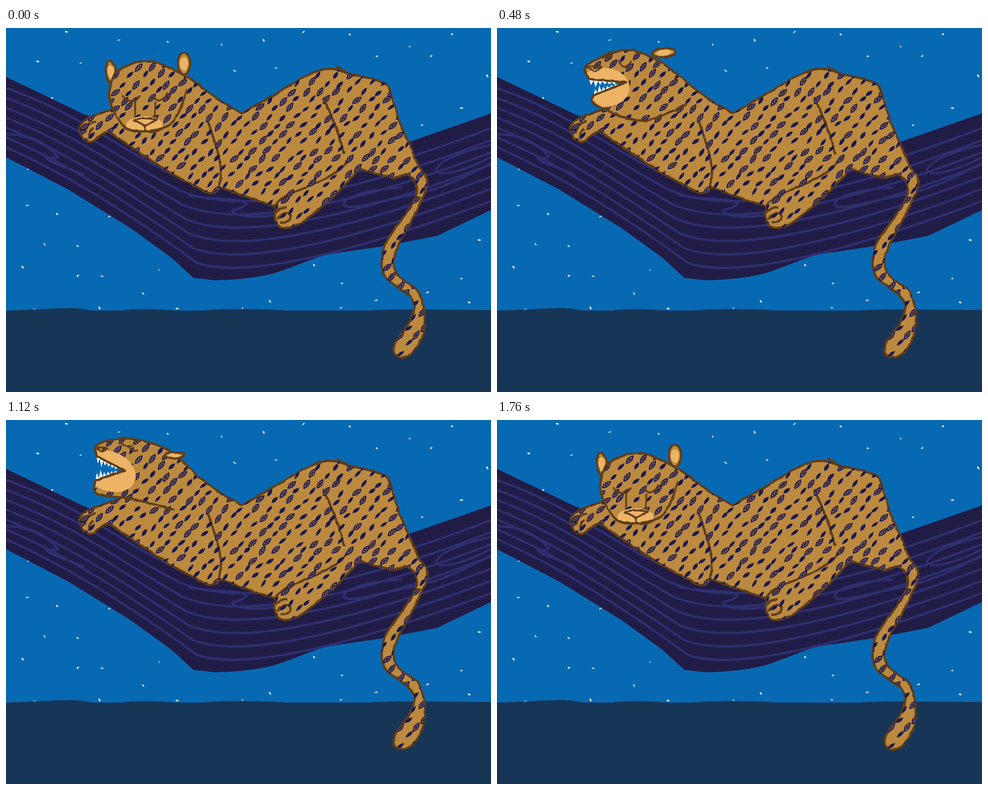
Write an HTML page that moves like this. It is 864x648 px and loops after 1840 ms.

```html
<!DOCTYPE html>
<html lang="en">
<head>
<meta charset="utf-8">
<title>Sleepy leopard</title>
<style>
  html, body { margin: 0; width: 100%; height: 100%; overflow: hidden; background: #0869b3; }
  svg { display: block; width: 100vw; height: 100vh; }
  .line { fill: none; stroke: #5f3d18; stroke-width: 4; stroke-linejoin: round; }
  .thin { stroke-width: 3.2; }
  .grain { fill: none; stroke: #2f2f70; stroke-width: 4; }
  .fur { fill: #bb8a3f; }
  .pale { fill: #edb466; }
  .bare { stroke: none; }
</style>
</head>
<body>
<svg viewBox="0 0 864 648">
  <defs>
    <filter id="rough" filterUnits="userSpaceOnUse" x="0" y="0" width="864" height="648" color-interpolation-filters="sRGB">
      <feTurbulence id="noise" type="fractalNoise" baseFrequency=".08" numOctaves="2" seed="1" result="n"/>
      <feDisplacementMap in="SourceGraphic" in2="n" scale="3.5" xChannelSelector="R" yChannelSelector="G"/>
    </filter>
    <path id="head"/>
    <path id="body"/>
    <path id="tail"/>
    <clipPath id="face"><use href="#head"/></clipPath>
    <clipPath id="skin"><use href="#head"/><use href="#body"/><use href="#tail"/></clipPath>
  </defs>

  <rect width="864" height="648" fill="#0869b3"/>
  <path id="stars" fill="#eef4f8"/>
  <path fill="#173556" d="M0,503 C50,502 90,498 125,499 C142,500 148,503 157,503 L206,503 C235,498 275,501 300,503 L350,503 C385,499 450,500 485,502 L497,503 L645,503 C690,499 780,502 864,502 V648 H0 Z"/>

  <path fill="#201c46" d="M0,87 L140,154 L420,260 L720,202 L864,152 V324 L768,370 L675,388 L566,404 L500,429 C465,443 420,448 372,449 L334,445 L297,411 L281,399 L220,355 L110,287 L0,230 Z"/>
  <path id="grain" class="grain"/>
  <g class="grain">
    <path d="M0,189 C45,190 72,204 92,229 C88,234 80,229 72,231 C80,242 105,246 140,262"/>
    <path d="M325,298 C380,308 425,302 428,313 C420,324 398,322 404,328 C425,342 470,332 500,334"/>
    <path d="M705,284 C655,286 604,298 601,314 C608,327 660,309 720,298 C780,286 825,262 864,240"/>
    <path d="M864,208 C815,219 770,236 766,253 C775,267 820,253 864,230"/>
  </g>

  <use href="#body" class="fur"/>
  <use href="#tail" class="fur"/>
  <g class="line" filter="url(#rough)">
    <path id="bodyLine"/>
    <use href="#tail"/>
    <path d="M480,318 C484,300 515,292 545,280 C570,266 600,256 607,236 M565,124 C578,150 592,182 602,224"/>
    <path d="M484,341 C487,329 507,325 507,336 C505,345 495,348 489,346 M481,329 Q489,318 500,319"/>
    <path d="M140,187 C143,172 151,168 160,166 M150,197 C146,188 150,182 156,179"/>
    <path d="M360,167 C371,203 390,242 380,282"/>
    <path d="M589,68 L606,79"/>
    <ellipse id="farEar" class="fur"/>
    <ellipse id="farEarIn" class="pale bare"/>
  </g>

  <use href="#head" class="fur"/>
  <g clip-path="url(#skin)">
    <path id="spots" fill="#1e1850"/>
    <path id="slits" fill="none" stroke="#8f6a45" stroke-width="1.2"/>
  </g>
  <g clip-path="url(#face)"><ellipse id="muzzle" class="pale"/></g>
  <path id="teeth" fill="#fff"/>
  <g class="line" filter="url(#rough)">
    <use href="#head"/>
    <ellipse id="ear" class="fur"/>
    <ellipse id="earIn" class="pale bare"/>
    <path id="gape" fill="#fff"/>
    <circle id="tongue" class="bare" style="fill:#e0a065"/>
    <path id="features" class="thin"/>
  </g>
</svg>
<script>
const $ = id => document.getElementById(id);
const set = (id, attrs) => {
  for (const k in attrs) $(id).setAttribute(k, attrs[k]);
};
const lerp = (a, b, t) => Array.isArray(a) ? a.map((v, i) => lerp(v, b[i], t)) : a + (b - a) * t;

let state = 7;
const rand = (lo, hi) => {
  state = (state * 16807) % 2147483647;
  return lo + (hi - lo) * state / 2147483647;
};

// Leaf outline centred on x,y: half length l, bulge w, turned by a
function leaf(x, y, l, w, a) {
  const c = Math.cos(a), s = Math.sin(a);
  const at = (u, v) => (x + u * c - v * s).toFixed(1) + ',' + (y + u * s + v * c).toFixed(1);
  return `M${at(-l, 0)}Q${at(-1, -w)} ${at(l, 0)}Q${at(1, w)} ${at(-l, 0)}Z`;
}

// Staggered grid with every point nudged at random
function scatter(x0, y0, x1, y1, dx, dy, jitter, put) {
  for (let y = y0, row = 0; y < y1; y += dy, row++)
    for (let x = x0 + (row % 2) * dx / 2; x < x1; x += dx)
      put(x + rand(-jitter, jitter), y + rand(-jitter, jitter));
}

let stars = '', spots = '', slits = '';
scatter(20, 15, 864, 500, 86, 52, 24, (x, y) => {
  stars += leaf(x, y, rand(1.8, 3.6), rand(1.5, 3.5), rand(-1.2, 1.2));
});
scatter(130, 38, 755, 590, 26, 15, 4, (x, y) => {
  const big = rand(0, 1) < .4, a = rand(-1.05, -.6);
  spots += big ? leaf(x, y, 10.5, 9, a) : leaf(x, y, rand(7.5, 9), rand(5, 7), a);
  if (big) slits += leaf(x, y, 6, 4, a);
});
set('stars', { d: stars });
set('spots', { d: spots });
set('slits', { d: slits });

// Wood grain: curves blended from the upper edge to the lower one
const upper = [0, 107, 130, 152, 200, 215, 300, 262, 420, 318, 640, 265, 864, 178];
const lower = [0, 212, 120, 265, 240, 345, 340, 418, 430, 450, 640, 392, 864, 308];
let grain = '';
for (let i = 0; i <= 6; i++) {
  const [x, y, ...rest] = lerp(upper, lower, i / 6);
  grain += `M${x},${y}C${rest}`;
}
set('grain', { d: grain });

const belly = `M212,137 C175,151 128,160 131,180 Q134,203 151,203 C163,200 169,186 182,184 C215,205 256,236 300,262
  L358,293 Q377,297 380,282 C412,296 445,306 480,318 C476,345 483,356 497,356 C520,355 528,345 545,332
  C580,306 605,280 629,250 C655,260 670,262 692,267 L712,260`;
const back = `737,250 L722,215 L700,165 L688,125 Q684,105 675,98 L650,90 L606,80 Q592,71 570,73
  C545,76 510,99 480,118 L420,152 L378,127 L325,88`;
set('body', { d: belly + 'L' + back });
set('bodyLine', { d: belly + 'M' + back });
set('tail', { d: `M712,260 C730,268 740,285 725,310 C705,345 685,365 675,385 C666,410 666,440 685,452
  C700,465 722,472 727,492 C731,510 712,535 695,557 C684,578 694,588 709,586 C730,582 747,550 746,520
  C746,490 738,466 722,458 C700,445 690,435 690,415 C692,385 726,345 740,306 C750,288 754,275 747,260 L735,247` });

// Head points: neck, crown, brow, nose, lip | mouth corner | jaw, chin, throat, cheek
// Ears and muzzle: x, y, rx, ry, turn. Eyes: x, y, half width, sag, tilt.
// Nose: x, y, half width, drop. front: facing the viewer, gape: open mouth seen from the front.
const poses = [
  {
    head: [[325, 88], [258, 59], [200, 76], [184, 115], [189, 142], [190, 144], [191, 147], [222, 182], [292, 172], [323, 110]],
    ear: [317, 63, 11, 19, 0], farEar: [187, 79, 9, 20, -8], muzzle: [247, 173, 33, 16, 0],
    eyes: [[223, 121, 16, 8, 0], [276, 119, 13, 10, -4]], nose: [248, 163, 21, 11], front: 1, gape: 0
  },
  {
    head: [[340, 98], [285, 58], [212, 50], [174, 106], [177, 122], [178, 124], [180, 128], [202, 152], [262, 166], [326, 136]],
    ear: [293, 46, 22, 13, -20], farEar: [207, 52, 9, 9, 0], muzzle: [208, 128, 31, 25, 0],
    eyes: [[199, 80, 11, 7, 0], [246, 82, 12, 9, 0]], nose: [193, 110, 15, 11], front: 0, gape: 1
  },
  {
    head: [[345, 102], [290, 60], [228, 39], [161, 66], [164, 91], [230, 97], [172, 120], [176, 137], [258, 165], [338, 136]],
    ear: [297, 44, 20, 8, -5], farEar: [228, 46, 2, 2, 0], muzzle: [190, 106, 46, 35, 0],
    eyes: [[196, 55, 8, -4, 0], [228, 58, 12, 11, 0]], nose: [174, 70, 13, 8], front: 0, gape: 0
  },
  {
    head: [[345, 104], [290, 52], [215, 31], [166, 35], [160, 55], [206, 88], [155, 103], [158, 130], [217, 133], [287, 168]],
    ear: [301, 69, 16, 5, 0], farEar: [240, 50, 1, 1, 0], muzzle: [182, 86, 50, 35, 30],
    eyes: [[222, 40, 11, 4, 4], [224, 46, 9, 2, 5]], nose: [170, 44, 8, 5], front: 0, gape: 0
  }
];

// Smooth curve through the points, continuing from the first one
function curve(pts) {
  const last = pts.length - 1;
  let d = '';
  for (let i = 0; i < last; i++) {
    const p = pts[Math.max(i - 1, 0)], a = pts[i], b = pts[i + 1], q = pts[Math.min(i + 2, last)];
    d += 'C' + [0, 1].map(k => a[k] + (b[k] - p[k]) / 6) + ' ' + [0, 1].map(k => b[k] - (q[k] - a[k]) / 6) + ' ' + b;
  }
  return d;
}

// Row of teeth from the front of the lip towards the mouth corner
function teethRow(a, b, h) {
  const n = 6, span = .74;
  const at = (u, off) => {
    const [x, y] = lerp(a, b, u);
    return x + ',' + (y + off);
  };
  let d = 'M' + at(0, 0);
  for (let i = 0; i < n; i++) {
    const size = h * (i === 1 ? 1.3 : 1 - i * .1);
    d += 'L' + at((i + .4) / n * span, size) + 'L' + at((i + 1) / n * span, h * .15);
  }
  return d + 'Z';
}

function oval(id, [x, y, rx, ry, turn], k = 1) {
  set(id, { rx: rx * k, ry: ry * k, transform: `translate(${x} ${y}) rotate(${turn})` });
}

const eye = ([x, y, w, sag, tilt]) => `M${x - w},${y - tilt}Q${x},${y + 2 * sag} ${x + w},${y + tilt}`;

function features({ eyes, nose: [x, y, w, drop], front: f }) {
  const tip = y + drop, side = s =>
    `M${x + s * 18},${y - 4}v${-28 * f}M${x},${tip + 7 * f}q${s * 14 * f},${10 * f} ${s * 30 * f},${-2 * f}`;
  return eyes.map(eye).join('') + side(-1) + side(1) +
    `M${x - w},${y}Q${x},${y - 4} ${x + w},${y}L${x},${tip}L${x - w},${y}M${x},${tip}v${7 * f}`;
}

function draw(p, seed) {
  const i = Math.min(Math.floor(p), poses.length - 2), pose = {};
  for (const k in poses[i]) pose[k] = lerp(poses[i][k], poses[i + 1][k], p - i);

  const { head, ear, farEar, nose, gape } = pose;
  const lip = head[4], corner = head[5], jaw = head[6];
  set('head', { d: `M${head[0]}${curve(head.slice(0, 5))}L${corner}L${jaw}${curve(head.slice(6))}` });

  const gap = jaw[1] - lip[1], bite = gap > 9 ? Math.min(12, gap * .36) : 0;
  set('teeth', { d: teethRow(lip, corner, bite) + teethRow(jaw, corner, -bite) });

  oval('ear', ear);
  oval('earIn', ear, .65);
  oval('farEar', farEar);
  oval('farEarIn', farEar, .65);
  oval('muzzle', pose.muzzle);

  const tip = nose[1] + nose[3];
  const rim = [[-12, 6], [1, 0], [24, 16], [17, 30], [-4, 25]].map(([x, y]) => [nose[0] + x * gape, tip + y * gape]);
  set('gape', { d: gape ? 'M' + rim.join('L') + 'Z' : '' });
  set('tongue', { cx: nose[0] + 4, cy: tip + 18, r: 8 * gape });
  set('features', { d: features(pose) });
  set('noise', { seed });
}

const STEP = 80, LOOP = 1840, END = LOOP / STEP - 1;

// Quick turn and opening, slower stretch, then the same way back
function yawn(slot) {
  const m = Math.min(slot, END - slot);
  return m < 6 ? m / 3 : Math.min(3, 2 + (m - 6) * .375);
}

const start = performance.now();
let shown = -1;
function tick() {
  let slot = Math.floor((performance.now() - start) % LOOP / STEP);
  if (slot === 10) slot = 9; // the wide yawn holds for two steps
  if (slot !== shown) {
    shown = slot;
    draw(yawn(slot), slot % END ? 2 + slot % 2 : 1);
  }
  requestAnimationFrame(tick);
}
tick();
</script>
</body>
</html>
```
